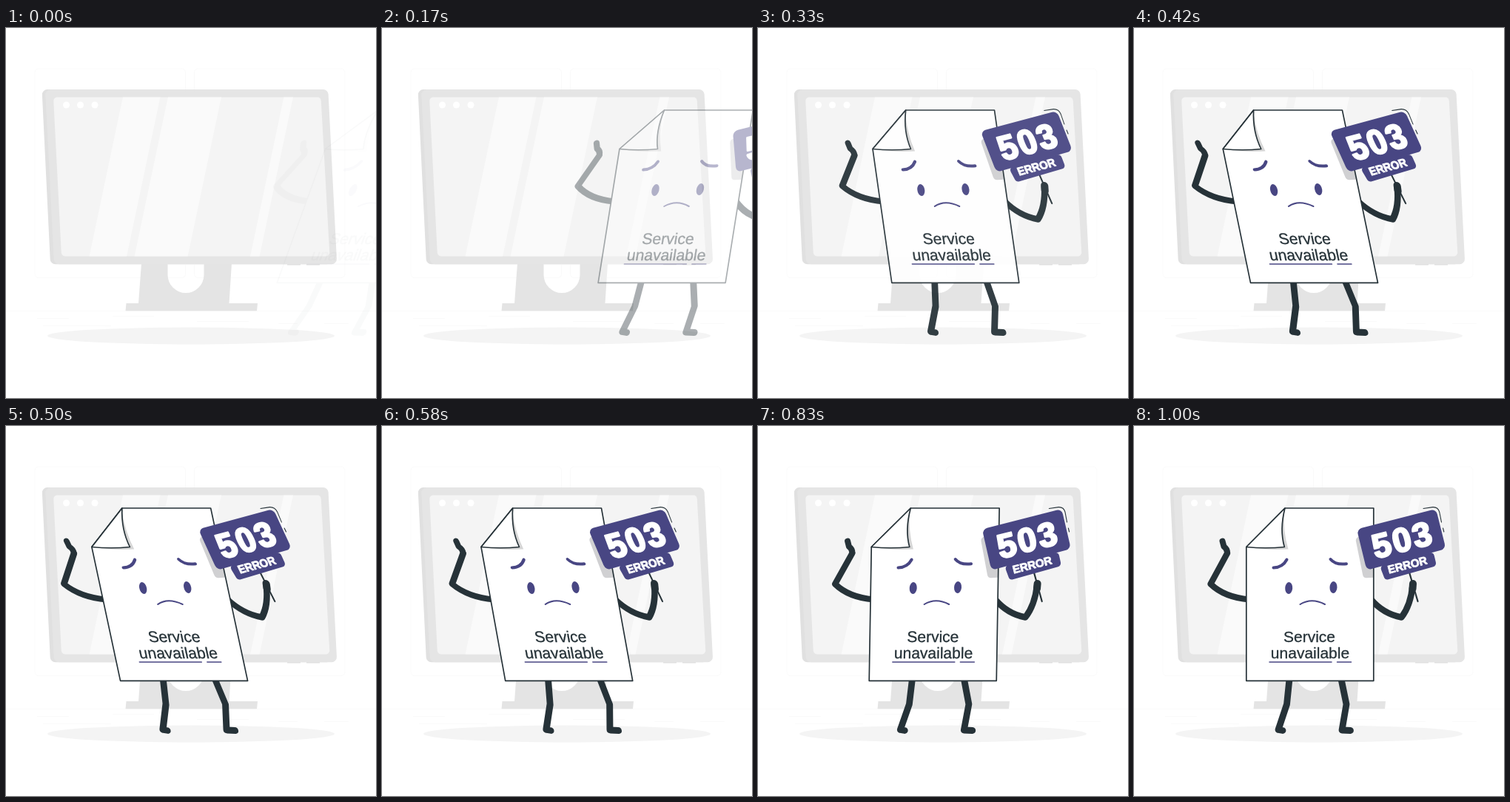
Recreate the animation shown at these times as an HTML page with a canvas. Size 500 px wide and 500 px high, loop 1040 ms.

```html
<!DOCTYPE html>
<html lang="en">
<head>
<meta charset="utf-8">
<title>Service unavailable</title>
<style>
html, body { margin: 0; width: 100%; height: 100%; overflow: hidden; background: #fff; }
canvas { display: block; width: 500px; height: 500px; }
</style>
</head>
<body>
<canvas id="stage"></canvas>
<script>
const SIZE = 500, LOOP = 1040, STEP = 1000 / 24;
const INK = '#263238', PURPLE = '#484683', GREY = '#e4e4e4', FAINT = '#ebebeb';
const FONT = '"Liberation Sans", Arial, sans-serif';
const dpr = window.devicePixelRatio || 1;

function prepare(canvas) {
  canvas.width = canvas.height = Math.round(SIZE * dpr);
  return canvas;
}
const stage = prepare(document.getElementById('stage'));
const room = prepare(document.createElement('canvas'));
const layer = prepare(document.createElement('canvas'));

function fill(c, shape, color, rule) {
  c.fillStyle = color;
  c.fill(typeof shape === 'string' ? new Path2D(shape) : shape, rule || 'nonzero');
}

function line(c, d, color, width) {
  c.strokeStyle = color;
  c.lineWidth = width;
  c.stroke(new Path2D(d));
}

function ellipse(c, x, y, rx, ry, color, turn = 0) {
  const p = new Path2D();
  p.ellipse(x, y, rx, ry, turn, 0, Math.PI * 2);
  fill(c, p, color);
}

// Polygon with rounded corners
function softPoly(pts, r) {
  const p = new Path2D(), n = pts.length, last = pts[n - 1];
  p.moveTo((last[0] + pts[0][0]) / 2, (last[1] + pts[0][1]) / 2);
  pts.forEach((a, i) => {
    const b = pts[(i + 1) % n];
    p.arcTo(a[0], a[1], b[0], b[1], r);
  });
  p.closePath();
  return p;
}

function label(c, str, x, y, size, { weight = 'normal', color = INK, turn = 0, bold = 0, gap = 0 } = {}) {
  c.save();
  c.translate(x, y);
  c.rotate(turn);
  c.font = `${weight} ${size}px ${FONT}`;
  c.letterSpacing = gap + 'px';
  c.textAlign = 'center';
  c.fillStyle = c.strokeStyle = color;
  c.fillText(str, gap / 2, 0);
  if (bold) {
    c.lineWidth = bold;
    c.strokeText(str, gap / 2, 0);
  }
  c.restore();
}

function drawRoom(c) {
  c.scale(dpr, dpr);
  c.fillStyle = '#fff';
  c.fillRect(0, 0, SIZE, SIZE);

  for (const x of [39, 254.5]) {
    c.strokeStyle = FAINT;
    c.lineWidth = 0.25;
    c.beginPath();
    c.roundRect(x, 55, 203.5, 282.5, 5);
    c.stroke();
  }
  const dashes = [[0, 382.4, 500], [42, 392, 43], [144, 389.6, 56], [50, 402, 92], [258, 396, 70], [368, 399.5, 26], [430, 399, 33]];
  c.fillStyle = FAINT;
  for (const [x, y, w] of dashes) c.fillRect(x, y, w, 0.25);

  ellipse(c, 250, 416, 194, 11.5, '#f4f4f4');

  fill(c, 'M183 318H305L301.5 372H340L339 382.3H161.5L162.5 372H179Z' +
    'M218.5 318V333.5A24.5 24.5 0 0 0 267.5 333.5V318Z', GREY, 'evenodd');
  fill(c, softPoly([[48.5, 83], [430, 83], [441, 319.3], [60, 319.3]], 7), '#e0e0e0');
  fill(c, softPoly([[53, 83], [435.3, 83], [447.3, 319.3], [65, 319.3]], 7), '#e5e5e5');
  const screen = softPoly([[64, 93.5], [425.5, 93.5], [437.5, 308.5], [75, 308.5]], 5);
  fill(c, screen, '#f4f4f4');
  c.save();
  c.clip(screen);
  for (const [a, b] of [[158, 208.5], [219, 291], [375.5, 388]]) {
    fill(c, `M${a} 93H${b}L${b - 45.5} 309H${a - 45.5}Z`, '#fafafa');
  }
  c.restore();
  for (const x of [81.5, 100.5, 120]) ellipse(c, x, 104, 4.5, 4.5, '#fff');
  line(c, 'M380 319.8H398M406 319.8H424', '#e0e0e0', 1.6);
}

function drawLimbs(c) {
  c.lineCap = c.lineJoin = 'round';
  line(c, 'M210 342L206.5 376L195 410.5L201 411.5M280 342L287 376L281 411L292.5 411.5', INK, 8.8);
  line(c, 'M156 234.5Q122 231.5 103.5 213.5L126 172', INK, 8.2);
  line(c, 'M126 171Q126 166 121.5 163L119.5 155.5', INK, 8);
  line(c, 'M320 234Q337 254 361.5 258.5Q374 242 376.5 215', INK, 8.4);
}

function drawPage(c) {
  const page = new Path2D('M204 111H323.8V344.3H151.8V163.5Z');
  fill(c, page, '#fff');
  c.save();
  c.clip(page);
  fill(c, softPoly([[299, 151], [330, 143], [336, 204], [310, 205.5]], 5), '#d0d0d2');
  fill(c, 'M203 114Q201 142 208.5 166.5Q180 168 156 164Z', '#d6d6d6');
  c.restore();
  c.strokeStyle = INK;
  c.lineWidth = 1.7;
  c.stroke(page);
  const fold = 'M204 111Q196.5 140 203.3 163.5Q178 166 151.8 163.5Z';
  fill(c, fold, '#fff');
  line(c, fold, INK, 1.7);

  line(c, 'M188.5 191.5Q201 191 206.5 180.5M265.5 180Q272 188 287 186.3', PURPLE, 4);
  ellipse(c, 209.2, 219, 5, 8, PURPLE, 0.05);
  ellipse(c, 269.5, 218, 5, 8, PURPLE, 0.05);
  line(c, 'M224.5 241Q240 231.5 258 241', PURPLE, 2);

  label(c, 'Service', 237, 292.3, 21, { bold: 0.3 });
  label(c, 'unavailable', 238, 313.5, 21, { bold: 0.3 });
  line(c, 'M183 318.9H267M274.5 318.9H293.5', PURPLE, 1.5);
}

function drawSign(c) {
  const tilt = -0.253;
  line(c, 'M371.5 196L383.5 237', INK, 2.2);
  line(c, 'M377 213L376.5 220', INK, 10);
  fill(c, softPoly([[332, 189], [404.5, 170], [409, 189], [339.5, 208.5]], 5), PURPLE);
  fill(c, softPoly([[301, 139.5], [408, 112], [421.5, 166], [314.5, 195]], 7), PURPLE);
  label(c, '503', 365.8, 169.2, 45.5, { weight: 'bold', color: '#fff', turn: tilt, bold: 2.6, gap: 2.8 });
  label(c, 'ERROR', 370.8, 192.8, 15, { weight: 'bold', color: '#fff', turn: tilt, bold: 0.9 });
  line(c, 'M391 111.5L404 109.6Q411 109.5 412.8 116.5L415.5 130M417.5 138L418.8 143', INK, 1.1);
}

function bezier(x1, y1, x2, y2) {
  const at = (a, b, s) => 3 * (1 - s) * (1 - s) * s * a + 3 * (1 - s) * s * s * b + s * s * s;
  return x => {
    let lo = 0, hi = 1;
    for (let i = 0; i < 30; i++) {
      const mid = (lo + hi) / 2;
      if (at(x1, x2, mid) < x) lo = mid; else hi = mid;
    }
    return at(y1, y2, lo);
  };
}
const rush = bezier(0.38, -0.01, 0.43, 1.41);
const settle = bezier(0.36, -0.01, 0.5, 1.38);
const mix = (a, b, p) => a + (b - a) * p;
const slope = deg => Math.tan(deg * Math.PI / 180);

// Slide in from the right leaning back, tip forward, sway and settle
function pose(t) {
  if (t < 591) {
    const p = rush((t + 29) / 620);
    return { dx: 250 * (1 - p), lean: mix(slope(-20), slope(10), p), alpha: Math.min(1, mix(0.015, 1, p)) };
  }
  const lean = t < 755
    ? mix(slope(10), slope(-2), settle((t - 591) / 164))
    : mix(slope(-2), 0, settle(Math.min(1, (t - 755) / 200)));
  return { dx: 0, lean, alpha: 1 };
}

function render(ms) {
  const tick = Math.min(24, Math.floor((Math.floor(ms / 10) * 10 + 5) / STEP));
  const { dx, lean, alpha } = pose(tick < 2 ? 0 : tick * STEP);

  const f = layer.getContext('2d');
  f.setTransform(1, 0, 0, 1, 0, 0);
  f.clearRect(0, 0, layer.width, layer.height);
  f.setTransform(dpr, 0, lean * dpr, dpr, (dx - lean * 250) * dpr, 0);
  drawLimbs(f);
  drawPage(f);
  drawSign(f);

  const c = stage.getContext('2d');
  c.globalAlpha = 1;
  c.drawImage(room, 0, 0);
  c.globalAlpha = alpha;
  c.drawImage(layer, 0, 0);
}

drawRoom(room.getContext('2d'));
const start = performance.now();
function loop() {
  render((performance.now() - start) % LOOP);
  requestAnimationFrame(loop);
}
loop();
</script>
</body>
</html>
```
